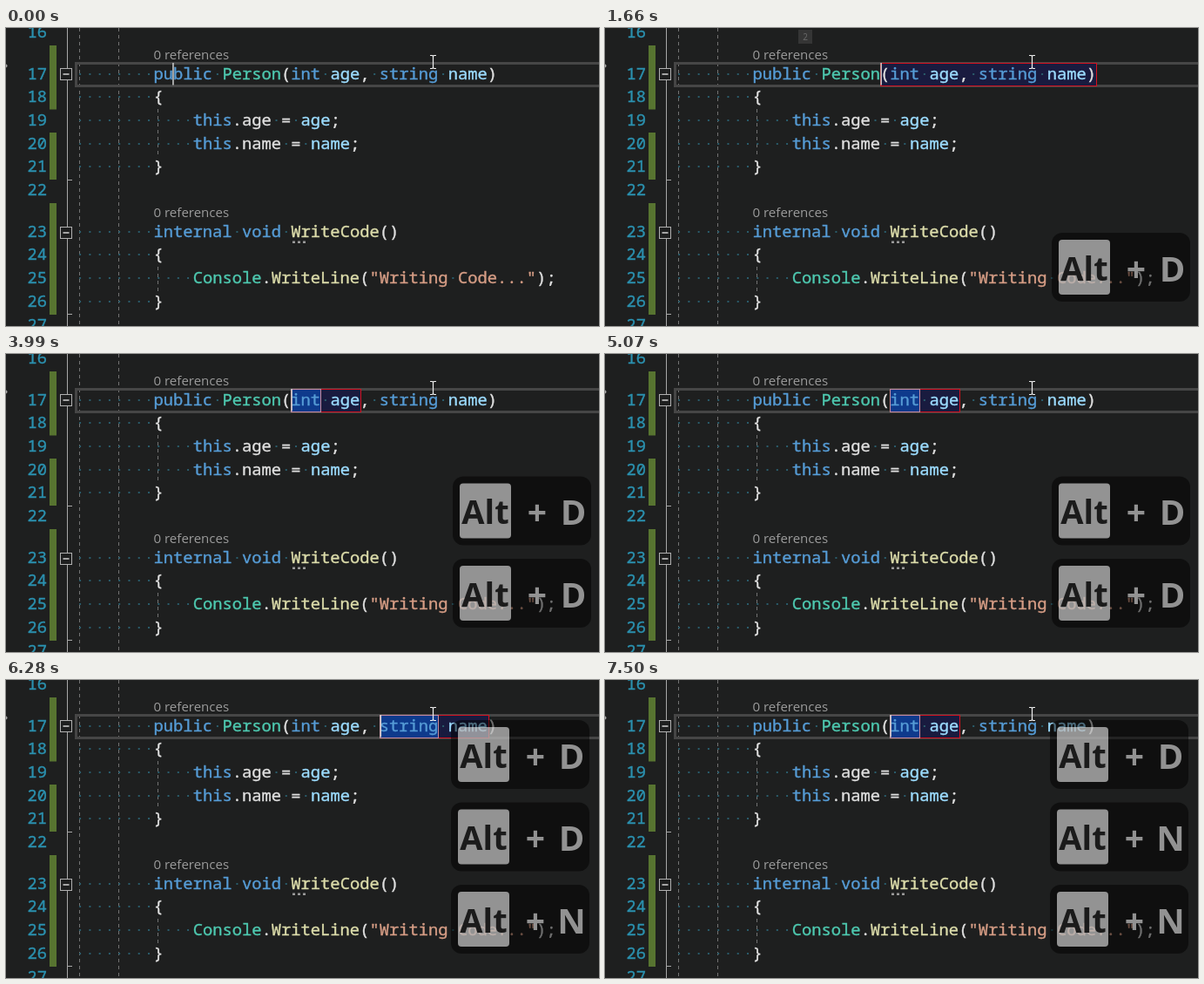
An HTML page for the animation above (8 s loop, 681x342 px).

```html
<!DOCTYPE html>
<html lang="en">
<head>
<meta charset="utf-8">
<title>Parameter navigation</title>
<style>
  html, body { margin: 0; width: 100%; height: 100%; overflow: hidden; background: #1e1f1f; }
  svg { display: block; width: 681px; height: 342px; }
  .code { font: 18.78px "Noto Sans Mono", monospace; stroke-width: 0.4px; }
  .lens { font: 15.05px "Open Sans", "Noto Sans", sans-serif; }
  .key { font-family: "Open Sans", "Noto Sans", sans-serif; font-weight: 700; text-anchor: middle; }
</style>
</head>
<body>
<svg id="stage" viewBox="0 0 681 342"></svg>
<script>
const LOOP = 8000;
const CW = 11.27, LEFT = 79.4;
const COLORS = {
  k: '#569cd6', t: '#4ec9b0', p: '#9cdcfe', w: '#e0e0e0', s: '#d69d85', m: '#dcdcaa'
};
const stage = document.getElementById('stage');

function el(parent, tag, attrs, text) {
  const node = document.createElementNS('http://www.w3.org/2000/svg', tag);
  for (const name in attrs) node.setAttribute(name, attrs[name]);
  if (text !== undefined) node.textContent = text;
  parent.appendChild(node);
  return node;
}
const group = (parent = stage) => el(parent, 'g', {});
const rect = (parent, x, y, width, height, fill, more) =>
  el(parent, 'rect', { x, y, width, height, fill, ...more });
const path = (parent, d, stroke, more) =>
  el(parent, 'path', { d, stroke, fill: 'none', ...more });
const codeText = (parent, x, y, color, text) =>
  el(parent, 'text', { class: 'code', x, y, fill: color, stroke: color }, text);
const show = (node, on) => node.setAttribute('visibility', on ? 'visible' : 'hidden');
const colX = col => LEFT + col * CW;

// Each code line: indent, then [colour, text] runs
const lines = {
  17: [8, ['k', 'public '], ['t', 'Person'], ['w', '('], ['k', 'int '], ['p', 'age'], ['w', ', '],
    ['k', 'string '], ['p', 'name'], ['w', ')']],
  18: [8, ['w', '{']],
  19: [12, ['k', 'this'], ['w', '.age = '], ['p', 'age'], ['w', ';']],
  20: [12, ['k', 'this'], ['w', '.name = '], ['p', 'name'], ['w', ';']],
  21: [8, ['w', '}']],
  23: [8, ['k', 'internal '], ['k', 'void '], ['m', 'WriteCode'], ['w', '()']],
  24: [8, ['w', '{']],
  25: [12, ['t', 'Console'], ['w', '.'], ['m', 'WriteLine'], ['w', '('],
    ['s', '"Writing Code..."'], ['w', ');']],
  26: [8, ['w', '}']]
};
// Whole-pixel baselines; a lens row sits above lines 17 and 23
const baseline = n =>
  n < 17 ? 11 : Math.floor(n < 23 ? 59 + (n - 17) * 26.7 : 240 + (n - 23) * 26.9);

function drawMargin() {
  const g = group();
  for (const [y, h] of [[20, 73.5], [120, 54], [201, 128]]) rect(g, 50, y, 8, h, '#577430');
  path(g, 'M70.5 0V342M70 174.5H76M70 328.5H76', '#a8a8a8');
  for (const y of [46.5, 228.5]) {
    rect(g, 62.5, y, 13, 13, '#1e1f1f', { stroke: '#b0b0b0' });
    path(g, `M65.5 ${y + 6.5}H72.5`, '#e0e0e0', { 'stroke-width': 1.4 });
  }
  path(g, 'M84.5 0V342M129.5 0V342M174.5 93V147M174.5 274V302', '#737373',
    { 'stroke-dasharray': '4 4' });
  el(g, 'circle', { cx: -0.5, cy: 43.5, r: 2, fill: '#a8a8a8' });
  for (let n = 16; n <= 27; n++) codeText(g, 24.5, baseline(n), '#2b91af', n);
}

function drawCode() {
  const g = group();
  for (const n in lines) {
    const [indent, ...runs] = lines[n];
    const y = baseline(+n);
    const dot = col => rect(g, colX(col) + 4.7, y - 7, 2, 2, '#2a5c6b');
    for (let col = 0; col < indent; col++) dot(col);
    let col = indent;
    for (const [color, text] of runs) {
      for (const part of text.split(/( )/)) {
        if (part === ' ') dot(col);
        else if (part) codeText(g, colX(col), y, COLORS[color], part);
        col += part.length;
      }
    }
  }
  for (const y of [35.5, 217])
    el(g, 'text', { class: 'lens', x: 169.5, y, fill: '#9b9b9b' }, '0 references');
  for (let i = 0; i < 3; i++) rect(g, 329 + i * 6, 244.5, 3, 2.5, '#9a9a9a');
}

function drawPopup(letter) {
  const g = group();
  const white = { 'fill-opacity': 0.55 };
  rect(g, 513, 0, 159, 79, '#000', { rx: 12, 'fill-opacity': 0.5 });
  rect(g, 521, 8, 59, 63, '#fff', { rx: 4, ...white });
  const label = (x, y, size, text, paint) =>
    el(g, 'text', { class: 'key', x, y, 'font-size': size, ...paint }, text);
  label(550.5, 54.5, 38, 'Alt', { fill: '#1b1b1b' });
  label(610, 55.5, 39, '+', { fill: '#fff', ...white });
  label(651.5, 55.5, 40, letter, { fill: '#fff', ...white });
  return g;
}

// Build the scene from back to front
drawMargin();
rect(stage, 80.5, 40.5, 620, 26, 'none', { stroke: '#464646', 'stroke-width': 3 });

const mark = (x, right, fill, stroke) =>
  rect(stage, x + 0.5, 40.5, right - x - 1, 26, fill, stroke ? { stroke } : {});
const RED = '#d5121e', NAVY = '#191b3f', BLUE = '#0e3a8c';
const name = mark(248, 316, '#44700f', '#87a648');
const fields = {
  all: mark(316, 565, NAVY, RED),
  age: mark(327, 408, NAVY, RED),
  name: mark(429, 555, NAVY, RED)
};
const braces = group();
for (const x of [317, 554]) rect(braces, x, 41, 10, 25, '#0e3a78');
const words = {
  age: mark(327, 362, BLUE, '#c98a9c'),
  name: mark(429, 497, BLUE, '#c98a9c')
};
drawCode();

const caret = rect(stage, 0, 40, 1.5, 25.5, '#d0d0d0');
const badge = group();
rect(badge, 222, 2, 16, 16, '#353535');
el(badge, 'text', { x: 230, y: 14, 'text-anchor': 'middle', fill: '#666',
  style: 'font:10px "Noto Sans Mono",monospace' }, '2');
path(stage, 'M487 31.5H489.5L490.5 32.5L491.5 31.5H494M490.5 32V46M487 46.5H489.5L490.5 45.5L491.5 46.5H494',
  '#eee', { 'stroke-width': 1.2 });

const presses = [[1660, 'D'], [3560, 'D'], [5320, 'N'], [6430, 'N']]
  .map(([at, letter]) => ({ at, node: drawPopup(letter) }));

// Caret: start time, x, then the times at which it toggles
const carets = [
  [0, 191.2, 560, 1110],
  [1660, 316.4, 2190, 2750, 3280],
  [3560, 327.4, 4110, 4540, 5070],
  [5320, 429.6, 5850, 6280],
  [6430, 327.4, 6970, 7500]
];
const selections = [[0, ''], [1660, 'all'], [3710, 'age'], [5320, 'name'], [6430, 'age']];
const latest = (list, t) => list.filter(item => item[0] <= t).pop();
const within = (t, from, to) => t >= from && t < to;

function render(t) {
  const [, x, ...toggles] = latest(carets, t);
  caret.setAttribute('x', x);
  show(caret, toggles.filter(at => at <= t).length % 2 === 0);

  const selected = latest(selections, t)[1];
  for (const id in fields) show(fields[id], id === selected);
  show(words.age, within(t, 3990, 5320) || t >= 6850);
  show(words.name, within(t, 6130, 6430));
  show(name, within(t, 2070, 3560));
  show(braces, within(t, 2070, 3560));
  show(badge, within(t, 990, 1790));

  const pressed = presses.filter(p => p.at <= t).length;
  const dx = t >= 5320 ? -2 : 0;
  presses.forEach(({ node }, i) => {
    const slot = pressed - 1 - i;
    const opacity = slot < 3 ? 1 : t < 6550 ? 0.8 : t < 6700 ? 0.4 : 0;
    show(node, slot >= 0 && opacity > 0);
    node.setAttribute('opacity', opacity);
    node.setAttribute('transform', `translate(${dx} ${235 - slot * 94.5})`);
  });
}

const start = performance.now();
function tick() {
  render((performance.now() - start) % LOOP);
  requestAnimationFrame(tick);
}
render(0);
requestAnimationFrame(tick);
</script>
</body>
</html>
```
